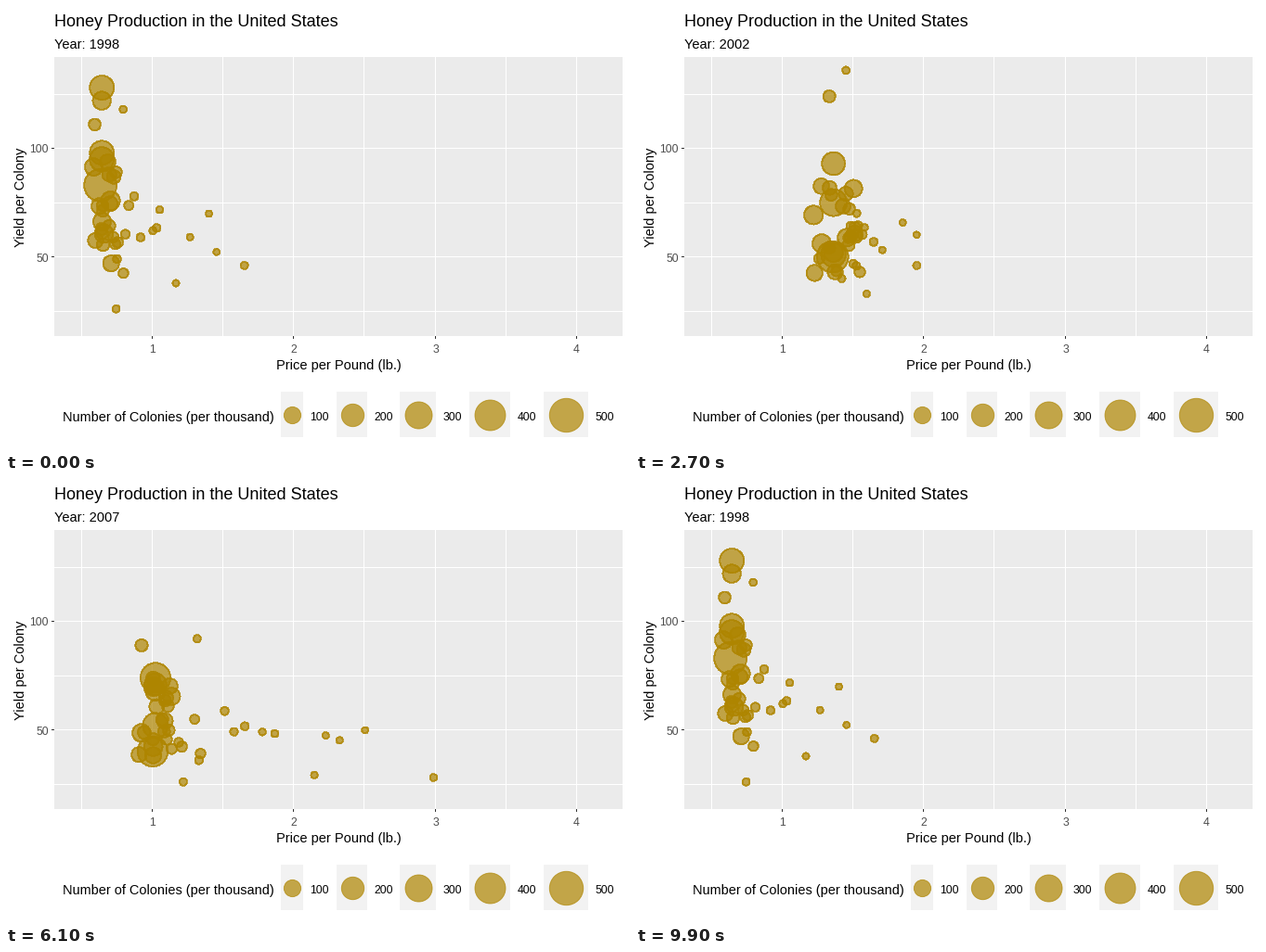
Write a matplotlib script that moves like this. It is 672x480 px and loops after 10000 ms.

```python
import numpy as np
import matplotlib.pyplot as plt
from matplotlib.animation import FuncAnimation
from matplotlib.patches import Rectangle

W, H, DPI = 672, 480, 96
HONEY, ALPHA = "#ae8500", 0.7
YEARS = np.arange(1998, 2013)
SURVEYS = [1998, 2000, 2002, 2004, 2007, 2009]

# Bulk and best retail price per pound, year by year.
BULK = np.array([.64, .57, .58, .69, 1.36, 1.4, 1.05, .88, .98, 1.02, 1.32, 1.42, 1.58, 1.74, 1.91])
RETAIL = np.array([1.65, 1.5, 1.5, 1.65, 1.95, 2.4, 2.1, 2.3, 2.65, 2.99, 2.98, 3.45, 3.8, 4.06, 4.15])

# Retail share of price, first and last colonies (thousands), yield per survey.
LEADERS = {
    "California": (-.01, 455, 345, [83, 70, 50, 45, 40, 33]),
    "North Dakota": (0, 235, 460, [128, 115, 75, 78, 74, 77]),
    "South Dakota": (0, 235, 270, [95, 121, 51, 105, 52, 66]),
    "Florida": (0, 230, 155, [98, 105, 93, 98, 71, 67]),
    "Montana": (0, 118, 165, [122, 88, 52, 76, 68, 70]),
    "Hawaii": (.15, 10, 11, [118, 112, 136, 96, 92, 95]),
    "Louisiana": (-.05, 40, 46, [111, 94, 124, 98, 89, 103]),
    "Maine": (.1, 10, 11, [26, 21, 40, 27, 26, 32]),
    "Virginia": (1, 10, 9, [46, 42, 46, 38, 28, 39]),
}


def leader_path(share, first, last, crops):
    price = BULK + share * (RETAIL - BULK)
    colonies = np.linspace(first, last, len(YEARS))
    return np.column_stack([price, np.interp(YEARS, SURVEYS, crops), colonies])


def other_states(count=34, seed=4):
    """Smaller producers sell dearer and harvest less per colony."""
    rng = np.random.default_rng(seed)
    rank = np.linspace(0, .95, count)
    shape = len(YEARS), count
    bulk, retail = BULK[:, None], RETAIL[:, None]
    price = bulk + rank ** 4.5 * (retail - bulk)
    price = price + .08 * (bulk - .1) * rng.uniform(-1.6, 1.6, shape)
    crop = np.interp(YEARS, [1998, 2004, 2012], [78, 67, 53])[:, None] * (1 - .3 * rank)
    crop = crop * (1 + .25 * rng.uniform(-1, 1, count) + .15 * rng.uniform(-1, 1, shape))
    colonies = 6 + 115 * (1 - rank) ** 2 * rng.uniform(.5, 1.3, count)
    return np.stack([price, crop, np.broadcast_to(colonies, shape)], axis=-1)


def radius(colonies):
    size = .7 + 11.6 * np.sqrt(np.clip(colonies - 2, 0, None) / 508)
    return .5 * (2.845 * size + .945) + .4


def to_pixels(rows):
    price, crop, colonies = np.moveaxis(rows, -1, 0)
    x = 52.6 + (price - .307) * 152
    y = 153.6 + (100 - crop) * 2.339
    return np.stack([x, y, radius(colonies)], axis=-1)


leaders = np.stack([leader_path(*facts) for facts in LEADERS.values()], axis=1)
clouds = to_pixels(np.concatenate([leaders, other_states()], axis=1))
STARTS = [4, 11, 18, 25, 32, 39, 46, 52, 59, 66, 73, 79, 85, 91, 97]

fig = plt.figure(figsize=(W / DPI, H / DPI), dpi=DPI, facecolor="white")
ax = fig.add_axes([0, 0, 1, 1])
ax.set_xlim(0, W)
ax.set_ylim(H, 0)
ax.axis("off")


def box(x, y, w, h, color):
    ax.add_patch(Rectangle((x, y), w, h, fc=color, lw=0, antialiased=False, zorder=1))


def label(x, y, text, size=14.6, color="black", **kw):
    return ax.text(x, y, text, fontsize=size * .75, color=color,
                   family=["Liberation Sans"], va="baseline", zorder=3, **kw)


def areas(r):
    return (1.5 * np.asarray(r)) ** 2


def bubbles(x, y, r):
    return ax.scatter(x, y, s=areas(r), c=HONEY, alpha=ALPHA, edgecolors=HONEY,
                      linewidths=.71, antialiased=False, zorder=2)


box(52, 55, 612, 301, "#ebebeb")
for y in (95, 153, 212, 270, 329):
    box(52, y, 612, 1, "white")
for x in (81, 157, 233, 309, 385, 462, 538, 614):
    box(x, 55, 1, 301, "white")
for n, x in enumerate((157, 309, 462, 614), 1):
    box(x, 356, 1, 3, "#333333")
    label(x + .5, 374, str(n), 12.3, "#4d4d4d", ha="center")
for n, y in ((100, 153), (50, 270)):
    box(49, y, 3, 1, "#333333")
    label(46, y + 5.5, str(n), 12.3, "#4d4d4d", ha="right")

label(52, 22, "Honey Production in the United States", 18)
year_text = label(52, 46, "")
label(358, 392, "Price per Pound (lb.)", ha="center")
label(20.5, 206, "Yield per Colony", ha="center", rotation=90, rotation_mode="anchor")

label(61, 448, "Number of Colonies (per thousand)", 14.5)
for n, left, width in ((100, 296, 24), (200, 356, 33), (300, 424, 39),
                       (400, 499, 44), (500, 579, 48)):
    box(left, 416, width, 49, "#f2f2f2")
    bubbles([left + width / 2], [441], [radius(n)])
    label(left + width + 7.5, 447, str(n), 12.3)

points = bubbles(*clouds[0].T)


def draw(frame):
    step = sum(frame >= s for s in STARTS)
    now, last = step % len(YEARS), max(step - 1, 0)
    progress = min((frame - STARTS[last] + 1) / 3, 1) if step else 1
    cloud = clouds[last] + (clouds[now] - clouds[last]) * progress
    points.set_offsets(cloud[:, :2])
    points.set_sizes(areas(cloud[:, 2]))
    year_text.set_text(f"Year: {YEARS[now if progress > .5 else last]}")
    return points, year_text


anim = FuncAnimation(fig, draw, frames=100, interval=100, repeat=True, repeat_delay=0)
plt.show()
```
